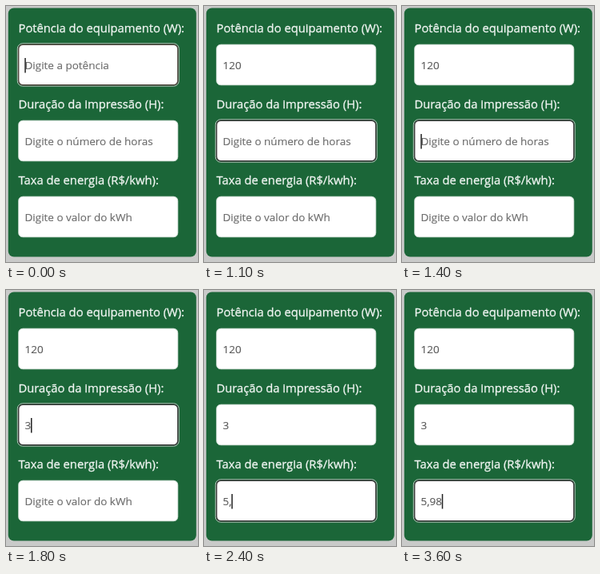
Animation of 240 by 320 pixels, one loop 3800 ms. Source, as an HTML page with a canvas:

```html
<!DOCTYPE html>
<html lang="pt-BR">
<head>
<meta charset="utf-8">
<title>Calculadora de energia</title>
<style>
  html, body { margin: 0; width: 100%; height: 100%; overflow: hidden; background: #c9cac9; }
  canvas { display: block; width: 240px; height: 320px; }
</style>
</head>
<body>
<canvas id="stage"></canvas>
<script>
const LOOP = 3800;
const FAMILY = '"Open Sans", "Noto Sans", sans-serif';
const LABEL_FONT = '14.75px ' + FAMILY;
const FIELD_FONT = '13.5px ' + FAMILY;
const PITCH = 95;

// Keys: [time in ms, typed text]; focus and caret: [from, to] spans.
const fields = [
  {
    label: 'Potência do equipamento (W):', hint: 'Digite a potência',
    keys: [[300, '1'], [500, '12'], [700, '120']],
    focus: [0, 1100], caret: [[0, 1100]], ring: '#51463f'
  },
  {
    label: 'Duração da impressão (H):', hint: 'Digite o número de horas',
    keys: [[1500, '3']],
    focus: [1100, 2000], caret: [[1300, 2000]], ring: '#393939'
  },
  {
    label: 'Taxa de energia (R$/kwh):', hint: 'Digite o valor do kWh',
    keys: [[2200, '5'], [2400, '5,'], [3200, '5,9'], [3500, '5,98']],
    focus: [2000, LOOP], caret: [[2100, 2900], [3200, LOOP]], ring: '#393939'
  }
];

const canvas = document.getElementById('stage');
const ctx = canvas.getContext('2d');
const scale = window.devicePixelRatio || 1;
canvas.width = 240 * scale;
canvas.height = 320 * scale;

const within = (t, [from, to]) => t >= from && t < to;

function box(x, y, w, h, r, color, line) {
  ctx.beginPath();
  ctx.roundRect(x, y, w, h, r);
  if (line) {
    ctx.strokeStyle = color;
    ctx.lineWidth = line;
    ctx.stroke();
  } else {
    ctx.fillStyle = color;
    ctx.fill();
  }
}

// A thin outline gives the text a little extra weight.
function write(text, x, y, font, color, weight) {
  ctx.font = font;
  ctx.fillStyle = ctx.strokeStyle = color;
  ctx.lineWidth = weight;
  ctx.fillText(text, x, y);
  ctx.strokeText(text, x, y);
}

function drawField(field, row, t) {
  const y = 48 + row * PITCH;
  const typed = field.keys.reduce((text, [at, value]) => t >= at ? value : text, '');

  write(field.label, 15.5, y - 15, LABEL_FONT, '#f0f5f2', 0.3);
  box(15.5, y, 199.5, 51, 5.5, '#fff');
  if (within(t, field.focus)) {
    box(14.3, y - 1.2, 201.9, 53.4, 6.5, '#b4c4ba', 1);
    box(15.7, y + 0.2, 199.1, 50.6, 5.5, field.ring, 1.4);
  } else {
    box(15.7, y + 0.2, 199.1, 50.6, 5.5, '#c3d5ca', 0.9);
  }
  write(typed || field.hint, 23.5, y + 31, FIELD_FONT, typed ? '#5c5c5c' : '#6c6c6c', 0.15);

  if (field.caret.some(span => within(t, span))) {
    const x = 23.5 + ctx.measureText(typed).width;
    ctx.fillStyle = '#222';
    ctx.fillRect(x - 0.2, y + 17, 1.5, 18.5);
  }
}

function draw(now) {
  const t = now % LOOP;
  ctx.setTransform(scale, 0, 0, scale, 0, 0);
  ctx.fillStyle = '#c9cac9';
  ctx.fillRect(0, 0, 240, 320);
  box(2.8, 2.5, 235, 311, 7, '#1b6638');
  fields.forEach((field, row) => drawField(field, row, t));
}

const start = performance.now();
function tick() {
  draw(performance.now() - start);
  requestAnimationFrame(tick);
}
tick();
</script>
</body>
</html>
```
